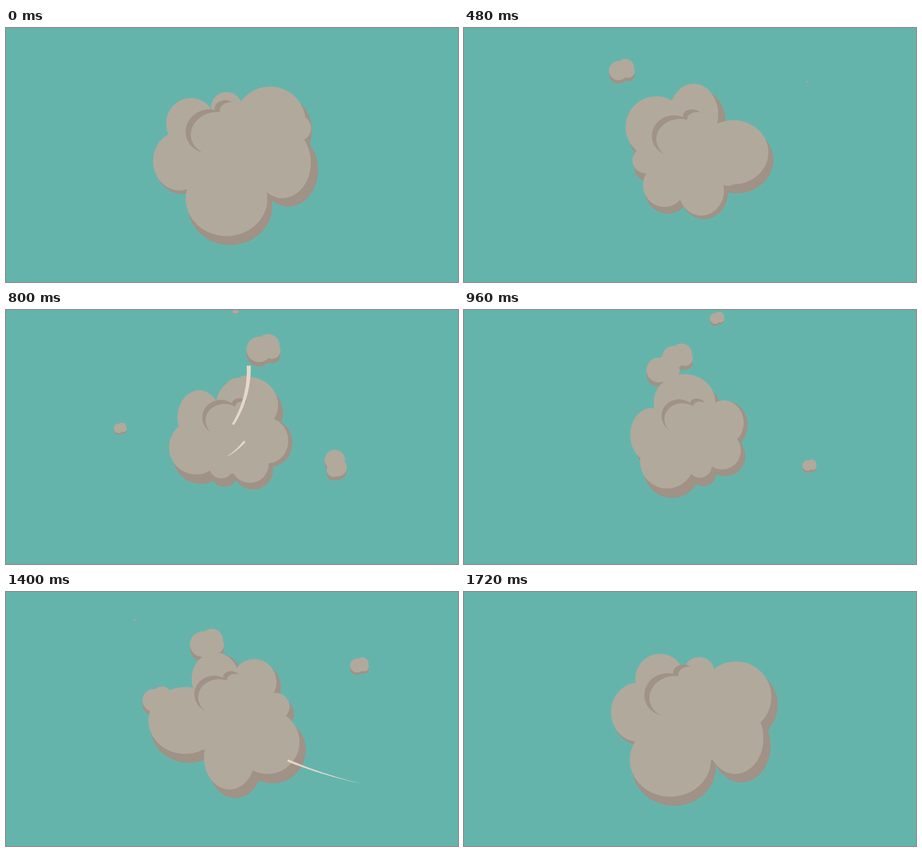
An HTML page with a canvas that plays this animation: 998x561 px, repeating every 1.76 s.

```html
<!DOCTYPE html>
<html lang="en">
<head>
<meta charset="utf-8">
<title>Dust cloud</title>
<style>
  html, body { margin: 0; width: 100%; height: 100%; overflow: hidden; background: #65b4ac; }
  canvas { display: block; width: 100%; height: 100%; }
</style>
</head>
<body>
<canvas id="stage" width="998" height="561"></canvas>
<script>
const ctx = document.getElementById('stage').getContext('2d');
const TEAL = '#65b4ac', LIGHT = '#b1a99c', DARK = '#a09286', CREAM = '#e6d8ca';
const LOOP = 1760, STEP = 40;
// One turn takes slightly longer than the loop, which cuts back a step early.
const TURN = 1800;
const CX = 497, CY = 276;

const rad = degrees => degrees * Math.PI / 180;
const clamp = u => Math.min(1, Math.max(0, u));
const easeOut = (u, power = 2) => 1 - (1 - u) ** power;
const wave = (t, lag = 0) => Math.cos(rad(360 * t / TURN - lag));

// Six lobes circle the centre and swell together.
const lobe = (angle, rx, ry, dx, dy) => ({ angle, rx, ry, dx, dy });
const lobes = [
  lobe(95, 79, 72, 8, 17),
  lobe(12, 55, 69, 13, 16),
  lobe(-42, 69, 69, 11, 18),
  lobe(-95, 30, 29, 7, 16),
  lobe(-140, 48, 49, 7, 12),
  lobe(-190, 51, 57, 6, 5)
];

function lobeAt({ angle, rx, ry, dx, dy }, t) {
  const a = rad(angle - 360 * t / TURN);
  const orbit = 1 + .17 * wave(t), size = 1 + .14 * wave(t);
  return {
    x: CX + 99 * orbit * Math.cos(a),
    y: CY + 87 * orbit * Math.sin(a),
    rx: rx * size, ry: ry * size, dx, dy
  };
}

// Small puffs leave the cloud, curl outwards and shrink away.
const spray = (style, rows) => rows.map(([start, life, angle, reach, size]) =>
  ({ ...style, start, life, angle, reach, size }));
const puffs = [
  ...spray({ ease: 2, swing: 12, spin: 360 }, [
    [-85, 580, -31, 305, 1],
    [480, 650, 14, 288, .8],
    [1120, 380, -22, 322, 1.05]
  ]),
  ...spray({ ease: 1, swing: 64, spin: 0 }, [
    [240, 400, -133, 328, .95],
    [480, 400, -177, 282, .95],
    [470, 380, -88, 300, .65],
    [520, 560, -77, 312, 1],
    [780, 640, -135, 308, .98],
    [840, 360, -117, 332, .9],
    [1100, 630, -117, 252, 1],
    [1100, 630, -176, 242, .9]
  ])
];
const PUFF_SHAPE = [[-11, 1, 28], [9, -8, 25], [17, 3, 19]];

function puffCircles(p, t) {
  const u = (t - p.start) / p.life;
  if (u < 0 || u >= 1) return [];
  const a = rad(p.angle + p.swing * (1 - u) ** 3);
  const distance = 95 + (p.reach - 95) * easeOut(u, p.ease);
  const size = p.size * Math.min(1, 2 * (1 - u));
  const turn = rad(p.spin * (.75 - u)), cos = Math.cos(turn), sin = Math.sin(turn);
  return PUFF_SHAPE.map(([x, y, r]) => ({
    x: CX + distance * Math.cos(a) + size * (x * cos - y * sin),
    y: CY + distance * Math.sin(a) + size * (x * sin + y * cos),
    r: size * r,
    drop: 10 * size
  }));
}

function ellipse(color, x, y, rx, ry = rx) {
  ctx.fillStyle = color;
  ctx.beginPath();
  ctx.ellipse(x, y, rx, ry, 0, 0, 2 * Math.PI);
  ctx.fill();
}

// Two dark bumps, mostly covered by two light ones.
function drawSwirl(t) {
  const size = 1 + .14 * wave(t, 30);
  ctx.save();
  ctx.translate(462 - 14 * wave(t), 232 + 7 * wave(t, 125));
  ctx.rotate(rad(-12 * wave(t, 15)));
  ctx.scale(size, size);
  ellipse(DARK, 0, 0, 46, 43);
  ellipse(DARK, 39, -40, 19, 14);
  ellipse(LIGHT, 12, 7, 49, 42);
  ellipse(LIGHT, 48, -34, 19, 14);
  ctx.restore();
}

// Tapered strokes; bow is how far the curve's control point leaves the chord.
const streak = (time, from, to, bow, startWidth, endWidth) =>
  ({ time, from, to, bow, startWidth, endWidth });
const streaks = [
  streak(200, [549, 102], [706, 68], -19, 2, 13),
  streak(200, [374, 198], [437, 282], 11, 4, 4),
  streak(200, [514, 304], [602, 359], 7, 5, 0),
  streak(800, [501, 253], [536, 123], 20, 5, 9),
  streak(800, [527, 290], [489, 323], -4, 5, 1),
  streak(1120, [355, 157], [391, 92], -60, 8, 6),
  streak(1400, [622, 372], [783, 423], 7, 5, 0)
];

function drawStreak({ time, from, to, bow, startWidth, endWidth }, t) {
  const u = (t - time) / 280 + .5;
  if (u <= 0 || u >= 1) return;
  const head = easeOut(clamp(2 * u)), tail = easeOut(clamp(2 * u - 1));
  const dx = to[0] - from[0], dy = to[1] - from[1], length = Math.hypot(dx, dy);
  const left = [], right = [];
  for (let i = 0; i <= 24; i++) {
    const q = tail + (head - tail) * i / 24;
    const lift = 2 * q * (1 - q) * bow / length;
    const x = from[0] + dx * q - dy * lift, y = from[1] + dy * q + dx * lift;
    const slope = 2 * (1 - 2 * q) * bow / length;
    const tx = dx - dy * slope, ty = dy + dx * slope;
    const half = (startWidth + (endWidth - startWidth) * q) / 2 / Math.hypot(tx, ty);
    left.push([x - ty * half, y + tx * half]);
    right.unshift([x + ty * half, y - tx * half]);
  }
  ctx.fillStyle = CREAM;
  ctx.beginPath();
  for (const point of left.concat(right)) ctx.lineTo(...point);
  ctx.fill();
}

function draw(t) {
  ctx.fillStyle = TEAL;
  ctx.fillRect(0, 0, 998, 561);
  const body = lobes.map(l => lobeAt(l, t));
  const circles = puffs.flatMap(p => puffCircles(p, t));

  for (const c of circles) ellipse(DARK, c.x, c.y + c.drop, c.r);
  for (const l of body) ellipse(DARK, l.x + l.dx, l.y + l.dy, l.rx + 3, l.ry + 3);

  ellipse(LIGHT, 500, 285, 87 * (1 + .13 * wave(t)));
  for (const l of body) ellipse(LIGHT, l.x, l.y, l.rx, l.ry);
  for (const c of circles) ellipse(LIGHT, c.x, c.y, c.r);

  drawSwirl(t);
  for (const s of streaks) drawStreak(s, t);
}

const started = performance.now();
function tick() {
  const t = (performance.now() - started) % LOOP;
  draw(Math.floor(t / STEP) * STEP);
  requestAnimationFrame(tick);
}
tick();
</script>
</body>
</html>
```
